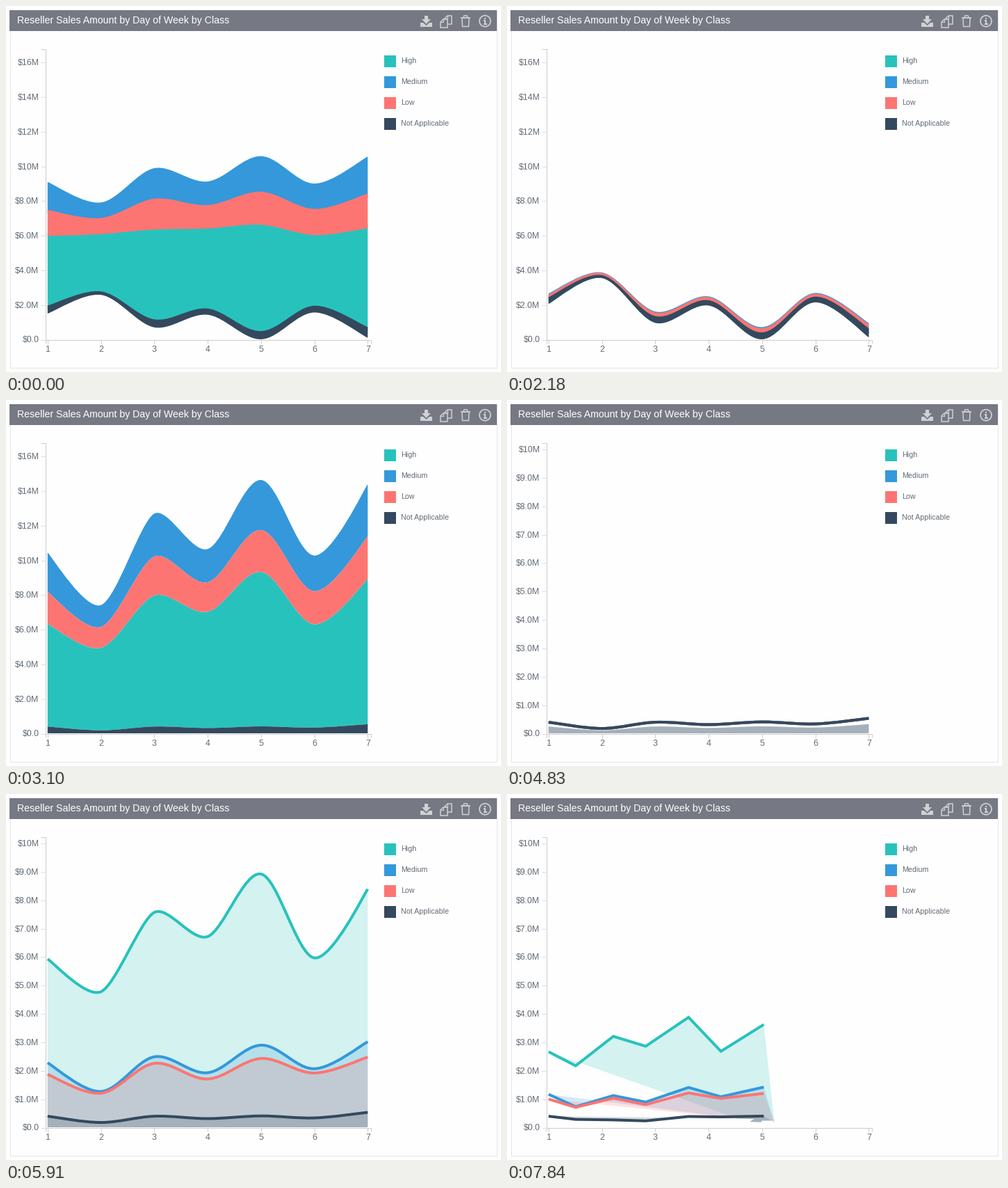
A matplotlib script for the animation above (7.99 s loop, 712 px wide and 526 px high).

```python
import numpy as np
import matplotlib.pyplot as plt
from matplotlib.animation import FuncAnimation
from matplotlib.patches import Circle, PathPatch, Polygon, Rectangle
from matplotlib.path import Path

W, H, DPI = 712, 526, 72
INTERVAL, LOOP = 34, 7990
plt.rcParams["font.family"] = "Liberation Sans"

NAMES = ["High", "Medium", "Low", "Not Applicable"]
COLORS = ["#28c2bc", "#3498db", "#fd7572", "#34495e"]
SALES = np.array([
    [5.92, 4.77, 7.56, 6.71, 8.91, 5.96, 8.38],
    [2.27, 1.26, 2.48, 1.92, 2.89, 2.06, 3.01],
    [1.86, 1.20, 2.25, 1.70, 2.42, 1.91, 2.47],
    [0.39, 0.17, 0.39, 0.306, 0.40, 0.33, 0.526],
])
STACK_ORDER = [3, 0, 2, 1]   # bottom to top
BASE = 479
WIDE, TIGHT = 24.9, 40.85    # pixels per million
X = np.linspace(59.8, 520.3, 7)
ZERO = np.zeros(7)

# Redraw times (ms), then (first redraw, tween start) of each chart type
STEPS = [0, 130, 280, 400, 2180, 2300, 2440, 2590, 2710, 2830, 2950, 3100,
         4830, 4960, 5110, 5230, 5380, 5530, 5660, 5790, 5910,
         7410, 7560, 7690, 7840]
STAGES = [("stream", 0, -583), ("stacked", 2180, 2005),
          ("spline", 4830, 4815), ("linear", 7410, 7372)]
TWEEN = 1000


def ease(t):
    t = min(max(t, 0), 1)
    return 4 * t**3 if t < 0.5 else 1 - 4 * (1 - t)**3


def mix(a, b, p):
    return a + (b - a) * p


def spline(y):
    """Bezier points of a monotone cubic through the seven days."""
    d = np.diff(y) / np.diff(X)
    m = np.concatenate([[d[0]], (d[:-1] + d[1:]) / 2, [d[-1]]])
    for i, slope in enumerate(d):
        if abs(slope) < 1e-6:
            m[i] = m[i + 1] = 0
            continue
        a, b = m[i] / slope, m[i + 1] / slope
        r = a * a + b * b
        if r > 9:
            r = 3 * slope / np.sqrt(r)
            m[i], m[i + 1] = r * a, r * b
    padded = np.concatenate([X[:1], X, X[-1:]])
    s = (padded[2:] - padded[:-2]) / (6 * (1 + m * m))
    knots = np.column_stack([X, y])
    tangents = np.column_stack([s, m * s])
    pts = [knots[0]]
    for i in range(6):
        pts += [knots[i] + tangents[i], knots[i + 1] - tangents[i + 1],
                knots[i + 1]]
    return np.array(pts)


def curve(values, scale):
    return spline(BASE - scale * values)


def band(low, high, scale):
    top = curve(high, scale)
    return np.vstack([top, curve(low, scale)[::-1], top[:1]])


def poly(values, scale):
    return np.column_stack([X, BASE - scale * values])


CURVE = [Path.MOVETO] + [Path.CURVE4] * 18
BAND = CURVE + [Path.LINETO] + [Path.CURVE4] * 18 + [Path.CLOSEPOLY]
# Smooth segments carry only their second control point and end point
SMOOTH = [0, 1] + [i for i in range(2, 19) if i % 3 != 1]

total = SALES.sum(axis=0)
silhouette = (total.max() - total) / 2
below = np.zeros_like(SALES)
acc = ZERO
for k in STACK_ORDER:
    below[k] = acc
    acc = acc + SALES[k]
above = below + SALES
na = SALES[3]

# Every series grows out of the shape that "Not Applicable" had before
band_from = {
    "stream": band(ZERO, na, TIGHT),
    "stacked": band(silhouette, silhouette + na, WIDE),
    "spline": band(ZERO, na, WIDE),
}
band_to = {
    "stream": [band(silhouette + l, silhouette + h, WIDE)
               for l, h in zip(below, above)],
    "stacked": [band(l, h, WIDE) for l, h in zip(below, above)],
    "spline": [band(ZERO, v, TIGHT) for v in SALES],
}
line_from = curve(na, TIGHT)
line_to = [curve(v, TIGHT) for v in SALES]
poly_from = line_from[SMOOTH]
poly_to = [np.vstack([poly(v, TIGHT), poly(ZERO, TIGHT)[::-1]])
           for v in SALES]

fig = plt.figure(figsize=(W / DPI, H / DPI), dpi=DPI, facecolor="white")
ax = fig.add_axes([0, 0, 1, 1])
ax.set(xlim=(0, W), ylim=(H, 0))
ax.axis("off")

BAR, ICON, AXIS, INK = "#767983", "#d0d1d5", "#cccccc", "#626b75"


def rect(x, y, w, h, color, **kw):
    ax.add_patch(Rectangle((x, y), w, h, fc=color, **{"lw": 0, **kw}))


def stroke(xs, ys, color=AXIS, lw=1, **kw):
    return ax.plot(xs, ys, color=color, lw=lw, solid_capstyle="butt", **kw)[0]


def label(x, y, text, size, color=INK, ha="left"):
    return ax.text(x, y, text, size=size, color=color, ha=ha, va="baseline")


def shape(pts, **kw):
    ax.add_patch(Polygon(pts, **{"fc": ICON, "lw": 0, **kw}))


def page(x, y):
    shape([(x + 4, y), (x + 10, y), (x + 10, y + 12), (x, y + 12), (x, y + 4)],
          fc=BAR, ec=ICON, lw=1.5)
    stroke([x, x + 4, x + 4], [y + 4, y + 4, y], ICON, 1.2)


def draw_header():
    rect(5.5, 6.5, 700, 513, "#fefefe", ec="#e4e4e6", lw=1)
    rect(5, 6, 701, 30, BAR)
    label(16, 25, "Reseller Sales Amount by Day of Week by Class", 14.1, "white")
    # download
    shape([(596, 24), (600, 24), (604.5, 28), (609, 24), (613, 24),
           (613, 30), (596, 30)])
    shape([(602, 14), (607, 14), (607, 19), (611, 19), (604.5, 25.8),
           (598, 19), (602, 19)])
    # copy
    page(630.5, 14)
    page(624.5, 18.5)
    # trash
    shape([(656, 17), (666, 17), (665.5, 29.5), (656.5, 29.5)],
          fc=BAR, ec=ICON, lw=1.5)
    stroke([654, 668], [17, 17], ICON, 1.6)
    stroke([658, 658.8, 663.2, 664], [17, 13.8, 13.8, 17], ICON, 1.4)
    # info
    ax.add_patch(Circle((689, 21.7), 8, fc="none", ec=ICON, lw=1.7))
    rect(687.7, 16.5, 2.6, 2.6, ICON)
    rect(687.7, 20.3, 2.6, 6, ICON)
    rect(686.5, 20.3, 2, 1.4, ICON)
    rect(686.5, 25.2, 5, 1.4, ICON)


def draw_axes():
    stroke([50, 56.5, 56.5], [61.5, 61.5, 480])
    stroke([56.5, 56.5, 524.5, 524.5], [485, 479.5, 479.5, 485])
    for i, x in enumerate(X):
        stroke([x, x], [480, 485])
        label(x, 497, str(i + 1), 12.4, ha="center")


def y_ticks(scale, step, top):
    """Tick marks and labels of one value axis."""
    parts = []
    for v in range(0, top + 1, step):
        y = BASE - scale * v
        text = f"${v}M" if v >= 10 else f"${v}.0M" if v else "$0.0"
        parts.append(stroke([50, 56], [y + 0.5, y + 0.5], "#dddddd"))
        parts.append(label(47.5, y + 4.5, text, 12.4, ha="right"))
    return parts


def draw_legend():
    for i, (name, color) in enumerate(zip(NAMES, COLORS)):
        rect(544, 71 + 30 * i, 17, 17, color)
        label(568.5, 82 + 30 * i, name, 10.6)


draw_header()
draw_axes()
draw_legend()
wide_ticks = y_ticks(WIDE, 2, 16)
tight_ticks = y_ticks(TIGHT, 1, 10)

blank = Path([(0, 0)])
areas = [ax.add_patch(PathPatch(blank, fc=c, lw=0, zorder=4)) for c in COLORS]
lines = [ax.add_patch(PathPatch(blank, fc="none", ec=c, lw=4, zorder=5,
                                capstyle="butt", joinstyle="miter"))
         for c in COLORS]


def update(i):
    # a step that falls inside this tick is shown from its start
    t = max(s for s in STEPS if s < (i + 1) * INTERVAL)
    stage, _, start = [s for s in STAGES if s[1] <= t][-1]
    p = ease((t - start) / TWEEN)
    overlaid = stage in ("spline", "linear")

    for part in wide_ticks:
        part.set_visible(not overlaid)
    for part in tight_ticks:
        part.set_visible(overlaid)

    for k, (area, line) in enumerate(zip(areas, lines)):
        area.set_alpha(0.2 if overlaid else 1)
        line.set_visible(overlaid)
        if stage == "linear":
            pts = mix(poly_from, poly_to[k], p)
            area.set_path(Path(np.vstack([pts, pts[:1]]), closed=True))
            line.set_path(Path(pts[:7]))
        else:
            pts = mix(band_from[stage], band_to[stage][k], p)
            area.set_path(Path(pts, BAND))
            line.set_path(Path(mix(line_from, line_to[k], p), CURVE))
    return areas + lines


anim = FuncAnimation(fig, update, frames=LOOP // INTERVAL, interval=INTERVAL,
                     repeat=True, repeat_delay=0, blit=False)
plt.show()
```
